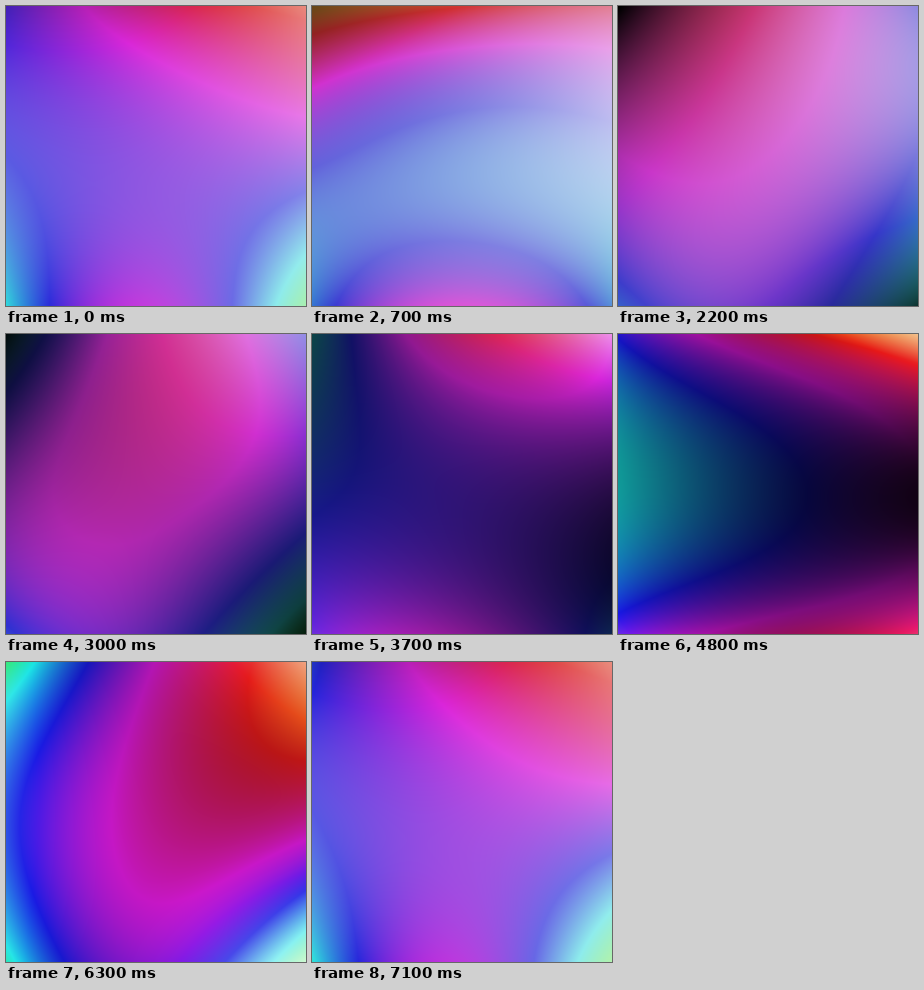
Animation of 300x300 px, one loop 7.2 s. Source, as an HTML page with a canvas:

```html
<!DOCTYPE html>
<html lang="en">
<head>
<meta charset="utf-8">
<title>Drifting colour field</title>
<style>
  html, body { margin: 0; width: 100%; height: 100%; overflow: hidden; background: #000; }
  canvas { display: block; width: 100vw; height: 100vh; }
</style>
</head>
<body>
<canvas id="stage" width="300" height="300"></canvas>
<script>
const SIZE = 300, LOOP = 7200, STEP = 100;

const ctx = document.getElementById('stage').getContext('2d');
const image = ctx.createImageData(SIZE, SIZE);
const pixels = image.data.fill(255);

// Hue in degrees: a tilting plane, a turning saddle and a pulsing bowl.
function hueField(angle) {
  const sin = Math.sin(angle), cos = Math.cos(angle);
  const sin2 = Math.sin(2 * angle), cos2 = Math.cos(2 * angle);
  const tiltX = 15 - 48 * sin;
  const tiltY = -22 - 14 * sin;
  const edgeY = -18 - 38 * cos;
  const twist = -22 + 30 * sin + 25 * sin2 - 20 * cos2;
  const saddle = -28 - 22 * sin2;
  const bowl = 15 + 50 * sin2;
  const corner = -44 - 22 * cos2;
  return (x, y) => {
    const xx = x * x, yy = y * y;
    return 268 - 50 * sin2 + tiltX * x + (tiltY + edgeY * xx) * y + twist * x * y
      + saddle * (xx - yy) + bowl * (xx + yy) + corner * xx * yy;
  };
}

// Lightness: a still base plus two shapes that trade places over the loop.
function lightField(angle) {
  const sin = Math.sin(angle), cos = Math.cos(angle);
  return (x, y) => {
    const xx = x * x, yy = y * y, xy = x * y;
    const base = .45 + .1 * x * yy - .12 * xy + .05 * xx * yy;
    const sway = .16 + .05 * xx - .1 * yy + .12 * xy + .04 * x + .05 * y;
    const swell = .23 - .05 * xx - .14 * yy - .18 * xx * yy - .12 * xy + .14 * x * (1 - yy);
    return Math.min(1, Math.max(0, base + cos * sway + sin * swell));
  };
}

// One channel of an HSL colour; offset 0, 8, 4 gives red, green, blue.
function hslChannel(hue, sat, light, offset) {
  const k = (offset + hue / 30 + 24) % 12;
  const ramp = Math.max(-1, Math.min(k - 3, 9 - k, 1));
  return 255 * (light - sat * Math.min(light, 1 - light) * ramp);
}

function draw(t) {
  const angle = 2 * Math.PI * t / LOOP;
  const hueAt = hueField(angle), lightAt = lightField(angle);
  const sat = .7 - .13 * Math.sin(angle);
  const unit = i => 2 * i / (SIZE - 1) - 1;
  let p = 0;
  for (let row = 0; row < SIZE; row++) {
    const y = unit(row);
    for (let col = 0; col < SIZE; col++, p += 4) {
      const x = unit(col);
      const hue = hueAt(x, y), light = lightAt(x, y);
      pixels[p] = hslChannel(hue, sat, light, 0);
      pixels[p + 1] = hslChannel(hue, sat, light, 8);
      pixels[p + 2] = hslChannel(hue, sat, light, 4);
    }
  }
  ctx.putImageData(image, 0, 0);
}

const start = performance.now();
let shown = -1;

function tick() {
  const elapsed = Math.max(0, performance.now() - start) % LOOP;
  const t = Math.floor(elapsed / STEP) * STEP;
  if (t !== shown) draw(shown = t);
  requestAnimationFrame(tick);
}
tick();
</script>
</body>
</html>
```
